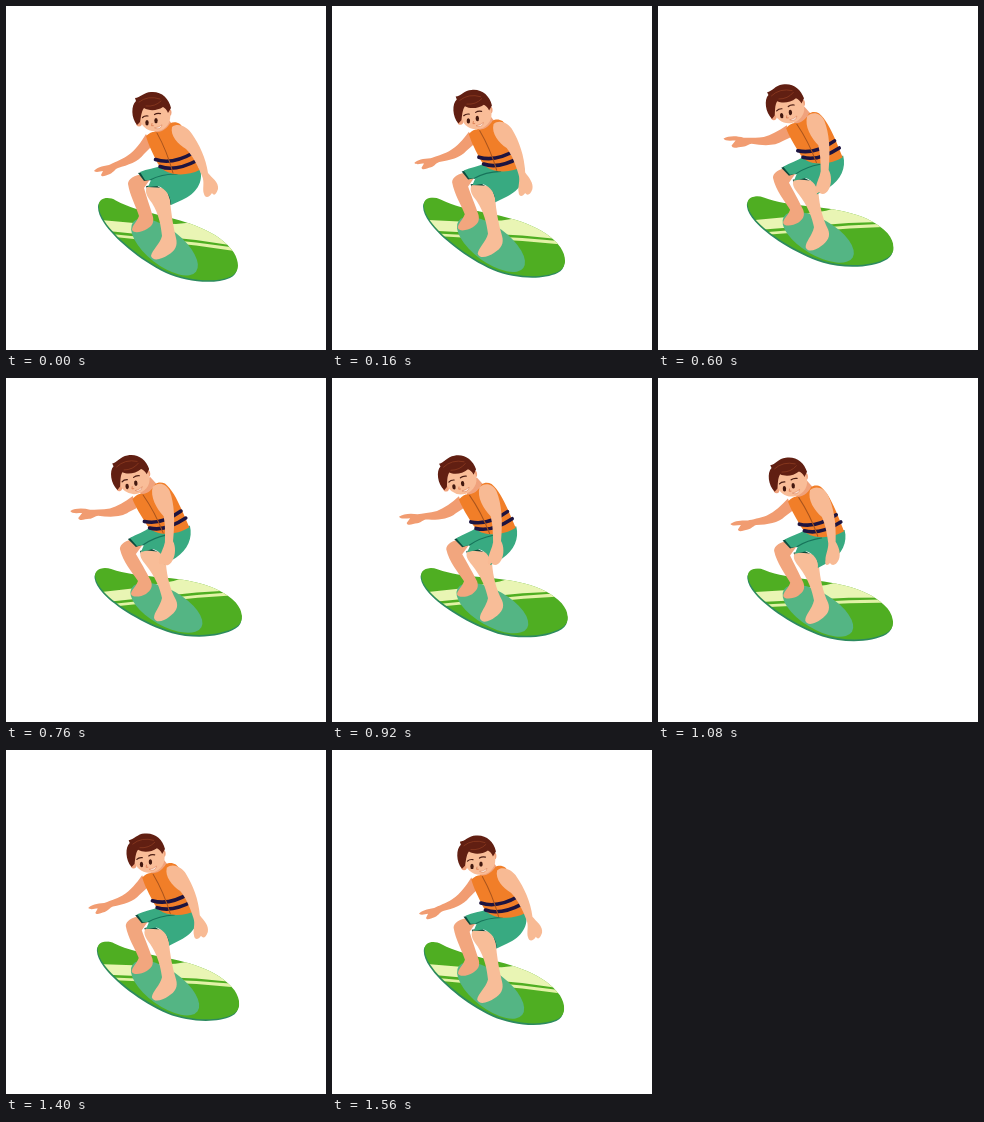
An HTML page for the animation above (1600 ms loop, 320 px wide and 344 px high).

```html
<!DOCTYPE html>
<html lang="en">
<head>
<meta charset="utf-8">
<title>Surfer</title>
<style>
  html, body { margin: 0; width: 100%; height: 100%; overflow: hidden; background: #fff; }
  svg { display: block; width: 100vw; height: 100vh; }
  .line { fill: none; stroke-linecap: round; stroke-linejoin: round; }
</style>
</head>
<body>
<svg viewBox="0 0 320 344">
  <defs>
    <path id="deck" d="M92 201C92 193 102 192 109 196C122 203 135 206 150 210C180 217 212 226 227 248C233 258 233 268 224 272C208 279 180 276 160 267C133 254 108 232 98 217C94 211 92 206 92 201Z"/>
    <clipPath id="deckClip"><use href="#deck" transform="translate(.8 -1.6)"/></clipPath>
  </defs>

  <g id="board">
    <use href="#deck" fill="#2c8a5f"/>
    <g clip-path="url(#deckClip)">
      <rect x="80" y="185" width="160" height="100" fill="#4fae22"/>
      <g id="stripes">
        <path d="M90 213.5L128 217L170 218L200 215L240 236V241.5L190 234L102 225Z" fill="#e9f5b4"/>
        <path d="M100 227.5L190 236.5L240 243V246.5L190 239.5L104 230.5Z" fill="#e2f2a6"/>
      </g>
    </g>
    <ellipse cx="158.5" cy="241" rx="40" ry="18" transform="rotate(38 158.5 241)" fill="#54b584"/>
  </g>

  <path id="farLeg" fill="#f2a67e"/>
  <path id="farArm" fill="#f19c71"/>
  <path id="hems" fill="#0d4a3c"/>
  <path id="nearLeg" fill="#f8bd98"/>
  <path id="shorts" fill="#38aa81"/>
  <path id="seam" class="line" stroke="#17735a" stroke-width="1.1"/>

  <g id="torso">
    <path d="M147 116L149 128Q159 131 166 118L160 110Z" fill="#f0a27c"/>
    <path d="M140 130C144 126 148 125 151 126C157 126 162 121 164 117.500C167 115.500 171 116 174 118C180 124 184 134 188 146L193.500 164C182 170 165 170 156 163L152 158C147 148 142 138 140 130Z" fill="#f17e28"/>
    <g class="line" stroke="#1d1440" stroke-width="3.6" stroke-linecap="butt">
      <path d="M149.500 153.500Q166 159 187 147"/>
      <path d="M154 160.500Q169 166 191 154.500"/>
    </g>
    <path class="line" d="M151 127Q161 145 167 167" stroke="#a9541d" stroke-width="1"/>
  </g>

  <g id="head">
    <ellipse cx="133" cy="116.500" rx="3" ry="4" fill="#f0a27c"/>
    <ellipse cx="163" cy="106.500" rx="2.500" ry="3.500" fill="#f0a27c"/>
    <ellipse cx="149" cy="110.500" rx="15.300" ry="14.800" fill="#f9bd98"/>
    <path d="M131 119C125 112 125 99 130 95L129 92C134 92 138 86 145 86C155 85 163 92 165 102L162 107C161 104 159 102 157 101C151 105 143 105 138 102C135 106 135 112 134 116Z" fill="#611f12"/>
    <g class="line" stroke="#8b3a20" stroke-width=".8">
      <path d="M133 96Q142 89 154 93"/>
      <path d="M140 100Q149 101 155 95"/>
    </g>
    <g class="line" stroke="#4a1d14" stroke-width="1.200">
      <path d="M136.500 111.500Q138.500 109.500 142 110"/>
      <path d="M148.500 108.500Q151 106.800 154.500 107.600"/>
    </g>
    <g fill="#42180f">
      <ellipse cx="141" cy="116.800" rx="1.700" ry="2.700"/>
      <ellipse cx="150" cy="114.600" rx="1.700" ry="2.700"/>
    </g>
    <path class="line" d="M146 117.500L145.500 119.700L147.300 119.700" stroke="#d9784f" stroke-width=".8"/>
    <path d="M148.500 121.800Q153 121.600 156 118.800Q155 123 151 122.800Z" fill="#fff0e5" stroke="#d9784f" stroke-width=".5"/>
  </g>

  <path id="nearArm" fill="#f8ba94"/>
</svg>
<script>
const LOOP = 1600, STEP = 40;
const TIMES = [0, 320, 600, 760, 920, 1080, 1240, 1560, 1600];
const BODY = [0, .47, .88, 1.01, .97, .74, .51, .05, 0];
const FAR_ARM = [0, .5, 1.03, .95, .72, .5, .33, .03, 0];
const NEAR_ARM = [0, .56, .97, 1.05, .97, .69, .38, .04, 0];

// Each limb swings between a tall and a crouched outline.
const SHAPES = {
  farLeg: [
    "M138 168C128 169 122 173 122 178C124 190 130 200 133 210C131 216 126 219 126 224C128 228 136 226 141 223C146 220 148 217 147 211C144 200 140 190 138 182L145 172Z",
    "M129 161C120 162 114 166 114 171C117 184 126 194 132 203C130 209 125 212 125 216C126 220 135 219 140 216C145 212 147 209 145 203C140 193 134 183 130 176L138 165Z"],
  nearLeg: [
    "M141 181C138 186 142 192 146 197C153 208 155 220 156 230C154 238 146 244 145 250C147 256 156 253 162 249C169 245 172 240 170 232C167 220 165 206 164 194L160 182Z",
    "M136 172C132 177 136 182 140 187C149 198 154 210 156 220C154 229 148 234 148 240C150 246 158 243 163 239C170 234 173 229 170 222C164 211 161 198 160 186L156 174Z"],
  hems: [
    "M132 167L137 166L144 174L138 175ZM140 180L150 179L166 190L165 199L162 198L150 184L141 183Z",
    "M122 161L127 159L136 167L130 169ZM134 173L144 170L160 178L158 187L155 187L145 174L135 176Z"],
  shorts: [
    "M134 166C141 163 149 162 156 160L194 163C198 176 190 188 176 194L165 199C165 190 160 183 152 180L142 181L145 174L139 174Z",
    "M124 160C131 156 138 154 145 149L184 148C187 160 182 172 170 180L158 187C160 180 154 173 147 171L135 174L138 167L131 168Z"],
  seam: ["M144 174Q155 168 171 168", "M137 167Q147 160 161 157"]
};
const ARMS = {
  farArm: [
    "M140 128C135 136 130 144 121 150C115 154 107 157 103 159C96 160 90 162 88 165C91 167 94 165 97 165L95 169C96 172 100 169 104 168C108 166 109 163 112 162C122 159 132 156 138 148L146 140Z",
    "M127 118C119 124 111 128 104 130C96 131 89 131 84 131C77 129 69 129 64 132C65 135 72 134 76 134L72 139C73 143 79 140 83 140C87 140 89 137 92 137C104 139 116 139 123 134L131 130Z"],
  nearArm: [
    "M166 121C172 116 182 121 186 128C193 138 200 152 202 167C206 172 213 176 212 183C210 189 208 190 206 187C203 192 199 192 198 188C196 183 199 176 196 170C192 160 187 150 180 143C172 138 164 130 166 121Z",
    "M147 109C152 104 160 105 164 113C169 126 170 142 168 163C171 168 171 177 168 182C165 188 160 188 158 185C155 188 153 185 155 180C156 174 159 170 160 164C160 155 160 146 158 138C151 131 144 119 147 109Z"]
};

const el = id => document.getElementById(id);

function morph([a, b], p) {
  const to = b.match(/[\d.]+/g);
  let i = 0;
  return a.replace(/[\d.]+/g, n => (+n + (to[i++] - n) * p).toFixed(2) + " ");
}

// Cubic curve through the table, with a hard turn at the loop point.
function sample(values, t) {
  const last = TIMES.length - 1;
  let i = 0;
  while (i < last - 1 && t >= TIMES[i + 1]) i++;
  const slope = k => {
    const lo = Math.max(k - 1, 0), hi = Math.min(k + 1, last);
    return (values[hi] - values[lo]) / (TIMES[hi] - TIMES[lo]);
  };
  const h = TIMES[i + 1] - TIMES[i], u = (t - TIMES[i]) / h, v = 1 - u;
  return values[i] * (1 + 2 * u) * v * v + values[i + 1] * u * u * (3 - 2 * u)
    + h * u * v * (slope(i) * v - slope(i + 1) * u);
}

function place(id, p, dx, dy, turn, cx, cy) {
  el(id).setAttribute("transform",
    `translate(${dx * p} ${dy * p}) rotate(${turn * p} ${cx} ${cy})`);
}

// Keeps the shoulder on the torso while the arm swings at its own pace.
function arm(id, p, body, dx, dy) {
  el(id).setAttribute("d", morph(ARMS[id], p));
  place(id, body - p, dx, dy, 0, 0, 0);
}

function draw(t) {
  const body = sample(BODY, t);
  place("board", body, 0, -11.5, -8.7, 161.5, 228.5);
  place("stripes", body, 0, 0, -3, 125, 222);
  place("torso", body, -12, -11.7, -6, 167, 145);
  place("head", body, -21, -8.7, -7, 146, 106);
  for (const id in SHAPES) el(id).setAttribute("d", morph(SHAPES[id], body));
  arm("farArm", sample(FAR_ARM, t), body, -15, -10);
  arm("nearArm", sample(NEAR_ARM, t), body, -18, -11);
}

const start = performance.now();
function tick() {
  const t = Math.max(0, performance.now() - start) % LOOP;
  draw(Math.floor(t / STEP) * STEP);
  requestAnimationFrame(tick);
}
tick();
</script>
</body>
</html>
```
